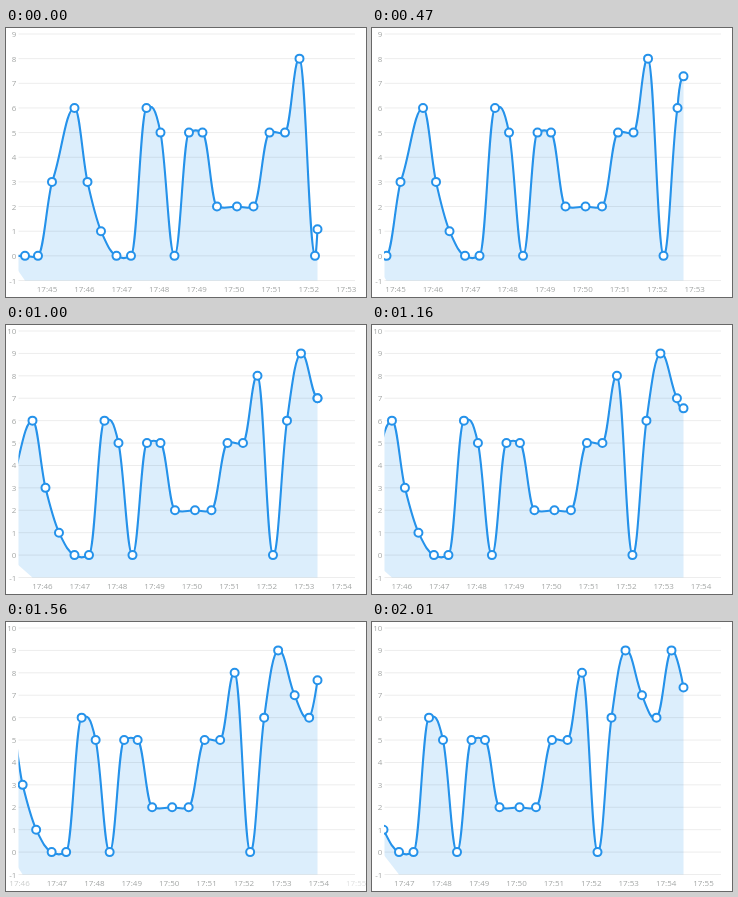
Write an HTML page with a canvas that moves like this. It is 360 px wide and 269 px high and loops after 2110 ms.

```html
<!DOCTYPE html>
<html lang="en">
<head>
<meta charset="utf-8">
<title>Live chart</title>
<style>
html, body { margin: 0; width: 100%; height: 100%; overflow: hidden; background: #fff; }
canvas { display: block; width: 360px; height: 269px; }
</style>
</head>
<body>
<canvas id="chart"></canvas>
<script>
const W = 360, H = 269, LOOP = 2110;
const LEFT = 12.5, RIGHT = 349, NOW = 311.5, TOP = 6, BASE = 252.5;
const BLUE = '#2592ea', FILL = '#dceefc', GRID = '#ededed', TEXT = '#a2a5a4';

const xs = [5, 19, 32, 46, 68.5, 81.5, 95, 110.5, 125, 140.5, 154.5, 168.5, 183, 196.5,
  211, 231, 247.5, 263.5, 279, 293.5, 309, 323, 337, 353.5, 368, 383, 397.5];
const values = [0, 0, 0, 3, 6, 3, 1, 0, 0, 6, 5, 0, 5, 5,
  2, 2, 2, 5, 5, 8, 0, 6, 9, 7, 6, 9, 7];

// time in ms, scroll in px
const scrollKeys = [[0, 0], [20, 0.2], [300, 10], [540, 20.5], [590, 21.5], [730, 28],
  [1000, 42], [1050, 42.8], [1310, 56.3], [1390, 57.3], [1560, 64.8], [1620, 67.8],
  [1670, 68.6], [2010, 83.5], [LOOP, 83.5]];

const canvas = document.getElementById('chart');
const ctx = canvas.getContext('2d');
const dpr = window.devicePixelRatio || 1;
canvas.width = W * dpr;
canvas.height = H * dpr;

const clamp = (v, lo, hi) => Math.max(lo, Math.min(hi, v));
const mix = (a, b, k) => a + (b - a) * k;

function scrollAt(t) {
  let i = 1;
  while (scrollKeys[i][0] < t) i++;
  const [t0, s0] = scrollKeys[i - 1], [t1, s1] = scrollKeys[i];
  return mix(s0, s1, (t - t0) / (t1 - t0));
}

function axisTop(t) {
  const k = clamp((t - 500) / 120, 0, 1);
  return 9 + k * k * (3 - 2 * k);
}

// Visible points; the newest one grows out of its predecessor.
function pointsAt(scroll, toY) {
  const pts = [];
  const head = scroll + NOW;
  for (let i = 0; i < xs.length; i++) {
    if (xs[i] - head < 1.6) {
      pts.push({ x: xs[i] - scroll, y: toY(values[i]) });
    } else {
      const k = (head - xs[i - 1]) / (xs[i] - xs[i - 1]);
      if (k > 0) pts.push({ x: NOW, y: toY(mix(values[i - 1], values[i], k)) });
      break;
    }
  }
  return pts;
}

function bound(v, a, b) {
  const slack = 3;
  return clamp(v, Math.min(a, b) - slack, Math.max(a, b) + slack);
}

function handles(p, i, pts) {
  const a = pts[i - 1], b = pts[i + 1];
  if (!a || !b) return { lx: p.x, ly: p.y, rx: p.x, ry: p.y };
  const lx = (1.5 * p.x + a.x) / 2.5, rx = (1.5 * p.x + b.x) / 2.5;
  let ly = (1.5 * p.y + a.y) / 2.5, ry = (1.5 * p.y + b.y) / 2.5;
  const shift = (ry - ly) * (rx - p.x) / (rx - lx) + p.y - ry;
  ly = bound(ly + shift, a.y, p.y);
  ry = bound(2 * p.y - ly, b.y, p.y);
  ly = 2 * p.y - ry;
  return { lx, ly, rx, ry };
}

function tracePath(pts) {
  const h = pts.map(handles);
  ctx.beginPath();
  ctx.moveTo(pts[0].x, pts[0].y);
  for (let i = 1; i < pts.length; i++) {
    const a = h[i - 1], b = h[i];
    ctx.bezierCurveTo(a.rx, a.ry, b.lx, b.ly, pts[i].x, pts[i].y);
  }
}

function clipLeft(x) {
  ctx.beginPath();
  ctx.rect(x, 0, W - x, H);
  ctx.clip();
}

function drawValueAxis(top, toY) {
  ctx.textAlign = 'right';
  ctx.lineWidth = 1;
  ctx.strokeStyle = GRID;
  for (let v = -1; v <= 10; v++) {
    const y = toY(v);
    if (y < -4) continue;
    ctx.globalAlpha = v > 9 ? top - 9 : 1;
    ctx.beginPath();
    ctx.moveTo(LEFT, y);
    ctx.lineTo(RIGHT, y);
    ctx.stroke();
    ctx.fillText(v, 10.3, y + 3);
  }
  ctx.globalAlpha = 1;
}

function drawTimeAxis(scroll) {
  ctx.textAlign = 'center';
  for (let m = 45; m <= 55; m++) {
    const x = 41 + (m - 45) * 37.4 - scroll;
    ctx.globalAlpha = clamp(Math.min((x - 9) / 8, (353 - x) / 8), 0, 1);
    ctx.fillText('17:' + m, x, 263.5);
  }
  ctx.globalAlpha = 1;
}

function drawSeries(pts) {
  const last = pts[pts.length - 1];
  const first = pts.findIndex(p => p.x >= LEFT);
  const inner = pts[first], outer = pts[first - 1];

  ctx.save();
  clipLeft(LEFT);
  tracePath(pts);
  ctx.lineTo(last.x, BASE);
  ctx.lineTo(inner.x, BASE);
  if (outer) ctx.lineTo(outer.x, BASE - 20);
  ctx.closePath();
  ctx.globalCompositeOperation = 'multiply';
  ctx.fillStyle = FILL;
  ctx.fill();
  ctx.globalCompositeOperation = 'source-over';
  tracePath(pts);
  ctx.strokeStyle = BLUE;
  ctx.lineWidth = 2.1;
  ctx.lineJoin = 'round';
  ctx.stroke();
  ctx.restore();

  ctx.save();
  clipLeft(12);
  ctx.fillStyle = '#fff';
  ctx.strokeStyle = BLUE;
  ctx.lineWidth = 2;
  for (const p of pts) {
    ctx.beginPath();
    ctx.arc(p.x, p.y, 4, 0, Math.PI * 2);
    ctx.fill();
    ctx.stroke();
  }
  ctx.restore();
}

function draw(t) {
  const scroll = scrollAt(t);
  const top = axisTop(t);
  const toY = v => BASE - (v + 1) * (BASE - TOP) / (top + 1);

  ctx.setTransform(dpr, 0, 0, dpr, 0, 0);
  ctx.fillStyle = '#fff';
  ctx.fillRect(0, 0, W, H);
  ctx.font = '8px "Open Sans", "Noto Sans", sans-serif';
  ctx.fillStyle = TEXT;
  drawValueAxis(top, toY);
  drawTimeAxis(scroll);
  drawSeries(pointsAt(scroll, toY));
}

const start = performance.now();
function tick() {
  draw((performance.now() - start) % LOOP);
  requestAnimationFrame(tick);
}
tick();
</script>
</body>
</html>
```
